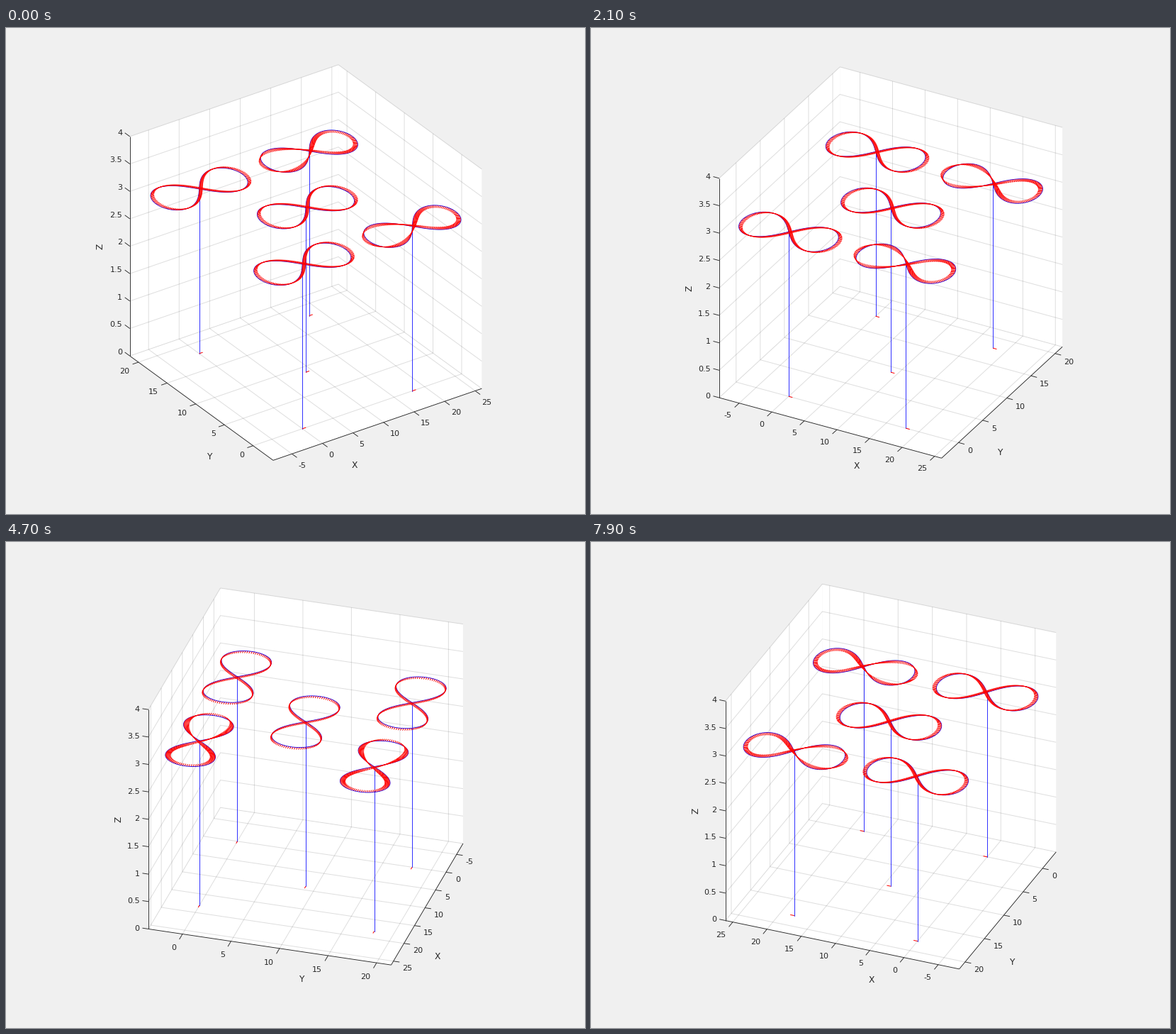
Recreate the animation shown at these times as a matplotlib script. Size 817 by 685 pixels, loop 8000 ms.

```python
import numpy as np
import matplotlib.pyplot as plt
from matplotlib.animation import FuncAnimation
from matplotlib.collections import LineCollection, PolyCollection

W, H, DPI = 817, 685, 72          # 72 dpi: one point is one pixel
FRAMES, STEP, AZ0 = 80, 3.0, -34.5
SIDE, CX, CY = 357.1, 422.5, 484.7
ZPX = SIDE * np.cos(np.radians(30)) / 4
MID = 9.0
A = 5 * np.sqrt(2)
HX, HY = MID + A + 1, MID + 3.5   # half extents of the floor
SX, SY = SIDE / (2 * HX), SIDE / (2 * HY)
XT, YT = np.arange(-5, 26, 5), np.arange(0, 21, 5)
ZT = np.arange(0, 4.1, 0.5)
TICK, ARM, HOVER = 8.7, 0.58, 3.0
INK = "#262626"

fig = plt.figure(figsize=(W / DPI, H / DPI), dpi=DPI, facecolor="#f0f0f0")
ax = fig.add_axes([0, 0, 1, 1])
ax.set_xlim(-0.5, W - 0.5)
ax.set_ylim(H - 0.5, -0.5)
ax.axis("off")


class View:
    """Orthographic view from 30 degrees above the floor."""

    def __init__(self, az):
        self.c, self.s = np.cos(np.radians(az)), np.sin(np.radians(az))
        sc, ss = np.sign(self.c), np.sign(self.s)
        self.front = MID + ss * HX, MID - sc * HY
        self.back = MID - ss * HX, MID + sc * HY
        self.left = MID - sc * HX, MID - ss * HY

    def __call__(self, x, y, z=0.0):
        u, v = (np.asarray(x) - MID) * SX, (np.asarray(y) - MID) * SY
        px = CX + u * self.c + v * self.s
        py = CY - 0.5 * (v * self.c - u * self.s) - np.asarray(z) * ZPX
        return np.stack(np.broadcast_arrays(px, py), axis=-1)

    def near(self, x, y):
        return (x - MID) * SX * self.s - (y - MID) * SY * self.c


def unit(v):
    return v / np.hypot(*v)


def make_text(s, size=11.1, **kw):
    return ax.text(0, 0, s, fontsize=size, family="DejaVu Sans", color=INK,
                   zorder=3, **kw)


class Drone:
    def __init__(self, x, y, spin):
        t = np.pi / 2 + np.linspace(0, 2 * np.pi, 201)
        r = A * np.cos(t) / (1 + np.sin(t) ** 2)
        self.home = x, y
        self.x, self.y = x + r, y + r * np.sin(t)
        yaw = 2 * (t - np.pi / 2) * spin
        self.hx, self.hy = self.x + ARM * np.cos(yaw), self.y + ARM * np.sin(yaw)
        self.pole, = ax.plot([], [], color="blue", lw=0.8)
        self.path, = ax.plot([], [], color="blue", lw=0.9)
        self.arms = LineCollection([], colors="red", linewidths=1)
        ax.add_collection(self.arms)

    def update(self, view):
        x, y = self.home
        self.pole.set_data(*view([x, x], [y, y], [0, HOVER]).T)
        self.path.set_data(*view(self.x, self.y, HOVER).T)
        arms = np.stack([view(self.x, self.y, HOVER),
                         view(self.hx, self.hy, HOVER)], axis=1)
        start = view([x, x + ARM], [y, y])
        self.arms.set_segments([*arms, start])
        depth = 10 + view.near(x, y) / 100
        for i, part in enumerate((self.pole, self.path, self.arms)):
            part.set_zorder(depth + i * 0.01)


walls = PolyCollection([], facecolors="white", edgecolors="none", zorder=0)
grid = LineCollection([], colors=[(0.15, 0.15, 0.15, 0.15)], linewidths=1, zorder=1)
rules = LineCollection([], colors=INK, linewidths=0.9, zorder=2)
for coll in (walls, grid, rules):
    ax.add_collection(coll)

x_nums = [make_text(str(v)) for v in XT]
y_nums = [make_text(str(v)) for v in YT]
z_nums = [make_text(f"{v:g}", ha="right") for v in ZT]
x_name, y_name = (make_text(s, 12.2, ha="center") for s in "XY")
z_name = make_text("Z", 12.2, ha="center", va="center", rotation=90)
drones = [Drone(x, y, x == 18)
          for x, y in ((0, 0), (0, 18), (9, 9), (18, 0), (18, 18))]


def draw_box(view):
    (fx, fy), (bx, by) = view.front, view.back
    x0, x1, y0, y1 = MID - HX, MID + HX, MID - HY, MID + HY
    walls.set_verts([
        view([x0, x1, x1, x0], [y0, y0, y1, y1]),
        view([bx] * 4, [y0, y1, y1, y0], [0, 0, 4, 4]),
        view([x0, x1, x1, x0], [by] * 4, [0, 0, 4, 4])])
    lines = [view([x, x, x], [fy, by, by], [0, 0, 4]) for x in XT]
    lines += [view([fx, bx, bx], [y, y, y], [0, 0, 4]) for y in YT]
    for z in ZT:
        lines.append(view([x0, x1], [by, by], z))
        lines.append(view([bx, bx], [y0, y1], z))
    grid.set_segments(lines)


def place_floor_number(txt, end, d):
    if abs(d[0]) < 0.47:
        ha, dx = "center", d[0]
    elif d[0] < 0:
        ha, dx = "right", -4
    else:
        ha, dx = "left", 4.5 * d[0] ** 4
    txt.set_ha(ha)
    txt.set_position((end[0] + dx, end[1] + 11.8 + 4 * d[1]))


def place_name(txt, mid, front, phi):
    """Slide an axis name towards the front corner as the axis turns away."""
    side = np.sign(front[0] - mid[0])
    dx = np.polyval([-0.00943, -0.185, 49.9], phi)
    dy = np.polyval([-0.00427, 0.891, 31.1], phi)
    txt.set_position((mid[0] + side * dx, mid[1] + dy + 4.4))


def draw_axes(view):
    (fx, fy), (bx, by) = view.front, view.back
    front, left = view(fx, fy), view(*view.left)
    x_end, y_end = view(bx, fy), view(fx, by)
    segs = [[front, x_end], [front, y_end], [left, left - [0, 4 * ZPX]]]

    dx, dy = unit(front - y_end), unit(front - x_end)
    for nums, pts, d in ((x_nums, view(XT, fy), dx), (y_nums, view(fx, YT), dy)):
        for txt, p in zip(nums, pts):
            segs.append([p, p + TICK * d])
            place_floor_number(txt, p + TICK * d, d)

    dz = unit(left - front)
    for txt, p in zip(z_nums, view(*view.left, ZT)):
        end = p + TICK * dz
        segs.append([p, end])
        txt.set_position(end + 2 * dz + [-2, 4])
    rules.set_segments(segs)

    phi = np.degrees(np.arctan2(abs(view.s), abs(view.c)))
    place_name(x_name, (front + x_end) / 2, front, phi)
    place_name(y_name, (front + y_end) / 2, front, 90 - phi)
    z_name.set_position(left - [42, 2 * ZPX])


def update(i):
    view = View(AZ0 + STEP * i)
    draw_box(view)
    draw_axes(view)
    for drone in drones:
        drone.update(view)
    return []


anim = FuncAnimation(fig, update, frames=FRAMES, interval=100, repeat=True,
                     repeat_delay=0, blit=False)
plt.show()
```
